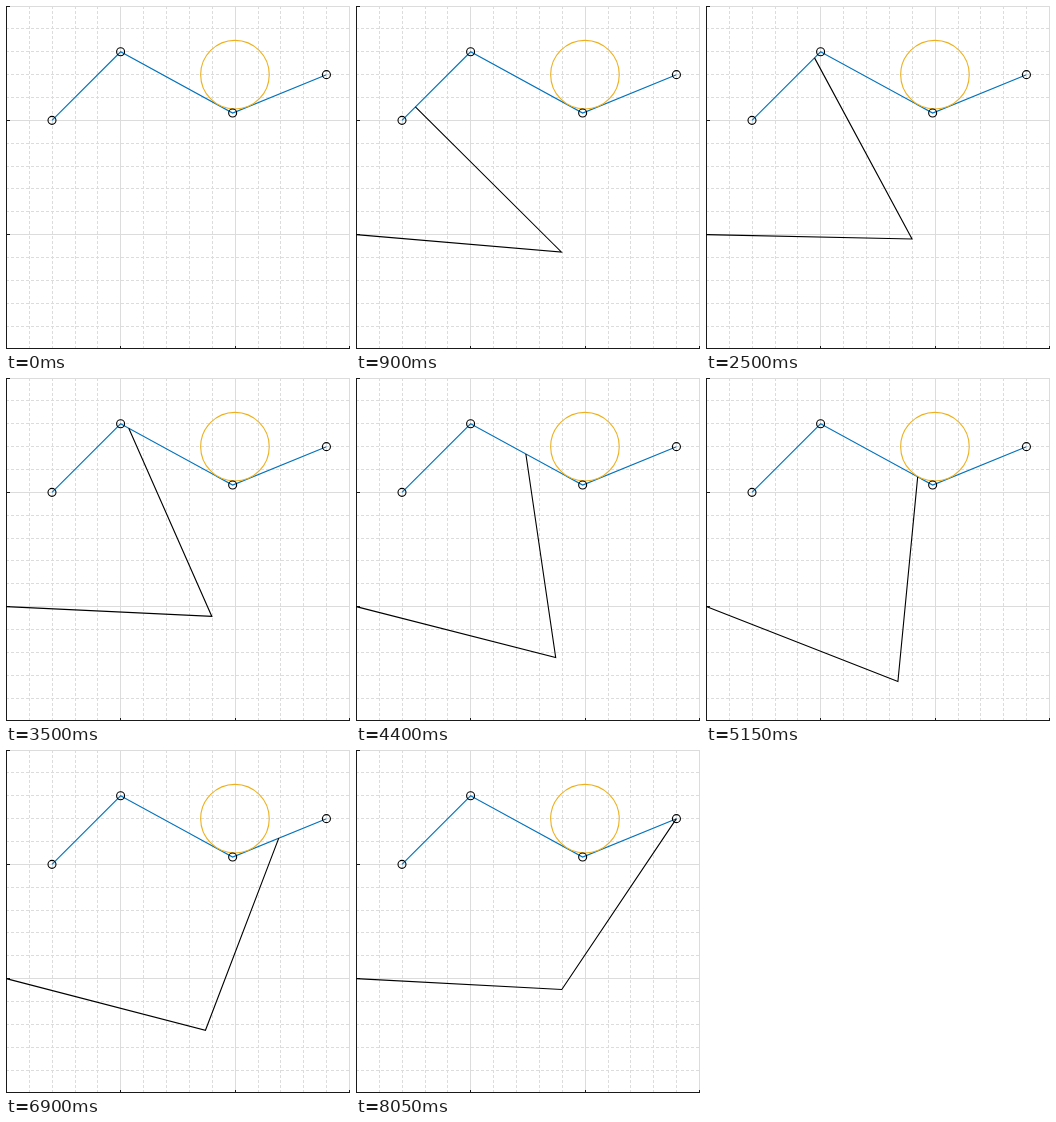
Animation of 344x344 px, one loop 8.1 s. Source, as an HTML page:

```html
<!DOCTYPE html>
<html lang="en">
<head>
<meta charset="utf-8">
<title>Two-link arm following a path</title>
<style>
  html, body { margin: 0; width: 100%; height: 100%; overflow: hidden; background: #fff; }
  svg { display: block; width: 344px; height: 344px; }
  path, circle { fill: none; stroke-width: 1.1; }
  .grid path { stroke-width: 1; shape-rendering: crispEdges; }
</style>
</head>
<body>
<svg viewBox="0 0 344 344">
  <g class="grid">
    <path id="minor" stroke="#dcdcdc" stroke-dasharray="3 2"/>
    <path id="major" stroke="#dcdcdc"/>
    <path id="axes" stroke="#1a1a1a"/>
  </g>
  <path id="route" stroke="#0072bd"/>
  <circle id="obstacle" stroke="#edb120"/>
  <g id="markers" stroke="#000"></g>
  <path id="arm" stroke="#000"/>
</svg>
<script>
const LOOP = 8100, STEP = 50, LINK = 9;
const waypoints = [[2, 5], [5, 8], [9.9, 5.32], [14, 7]];
const arrivals = [0, 3, 5.725, 8]; // seconds

const get = id => document.getElementById(id);
const px = x => 0.25 + 22.87 * x;
const py = y => 228.6 - 22.85 * y;
const polyline = points =>
  'M' + points.map(([x, y]) => `${px(x).toFixed(2)} ${py(y).toFixed(2)}`).join('L');

// Grid lines sit on whole pixels.
const gridX = i => Math.floor(px(i) + 0.25) + 0.5;
const gridY = i => Math.floor(py(i - 5)) + 0.5;

function drawScene() {
  const lines = { minor: '', major: '' };
  let axes = 'M.5 0V343M0 342.5H344';
  for (let i = 0; i <= 15; i++) {
    const x = gridX(i), y = gridY(i);
    lines[i % 5 ? 'minor' : 'major'] += `M${x} 343V0M0 ${y}H344`;
    if (i % 5 === 0) axes += `M${x} 343V340M0 ${y}H4`;
  }
  get('minor').setAttribute('d', lines.minor);
  get('major').setAttribute('d', lines.major);
  get('axes').setAttribute('d', axes);

  get('route').setAttribute('d', polyline(waypoints));
  const obstacle = get('obstacle');
  obstacle.setAttribute('cx', px(10));
  obstacle.setAttribute('cy', py(7));
  obstacle.setAttribute('r', 1.5 * 22.86);
  get('markers').innerHTML = waypoints
    .map(([x, y]) => `<circle cx="${px(x)}" cy="${py(y)}" r="4"/>`).join('');
}

// Cubic ease along each straight segment, resting at every waypoint.
function tipAt(seconds) {
  let i = 0;
  while (i < 2 && seconds >= arrivals[i + 1]) i++;
  const u = Math.min(1, (seconds - arrivals[i]) / (arrivals[i + 1] - arrivals[i]));
  const s = u * u * (3 - 2 * u);
  const [from, to] = [waypoints[i], waypoints[i + 1]];
  return from.map((v, axis) => v + (to[axis] - v) * s);
}

// Inverse kinematics with the elbow below the line from base to tip.
function elbowFor([x, y]) {
  const reach = Math.hypot(x, y);
  const offset = Math.sqrt(LINK * LINK - reach * reach / 4) / reach;
  return [x / 2 + y * offset, y / 2 - x * offset];
}

function render(ms) {
  const step = Math.floor((ms % LOOP) / STEP) - 1;
  let d = '';
  if (step > 0) {
    const tip = tipAt(step * STEP / 1000);
    d = polyline([[0, 0], elbowFor(tip), tip]);
  }
  get('arm').setAttribute('d', d);
}

drawScene();
const start = performance.now();
function tick() {
  render(performance.now() - start);
  requestAnimationFrame(tick);
}
tick();
</script>
</body>
</html>
```
